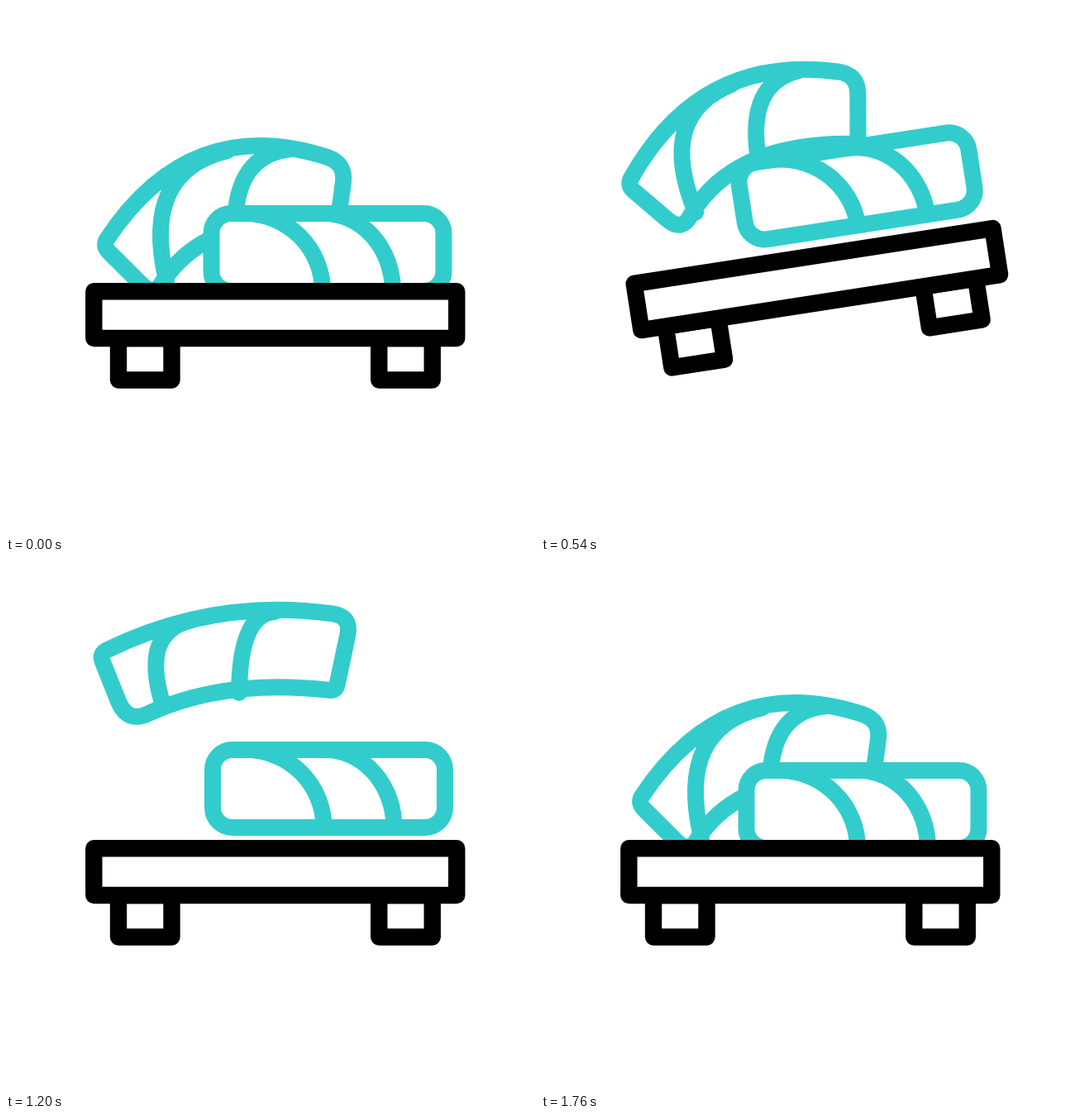
An HTML page with a canvas for the animation above (1800 ms loop, 640 px wide and 640 px high).

```html
<!DOCTYPE html>
<html lang="en">
<head>
<meta charset="utf-8">
<title>Sushi toss</title>
<style>
  html, body { margin: 0; width: 100%; height: 100%; overflow: hidden; background: #fff; }
  canvas { display: block; width: 640px; height: 640px; }
</style>
</head>
<body>
<canvas id="stage" width="640" height="640"></canvas>
<script>
const ctx = document.getElementById('stage').getContext('2d');
const LOOP = 1800, STEP = 20;
const TEAL = '#33cccc', BLACK = '#000';

// Key points of the slice: bent x, y, then flat x, y
const SLICE = {
  tip: [117, 290, 113, 221],
  crown: [226, 117.5, 257, 147],
  shoulder: [411, 191, 418, 176],
  heel: [400, 272, 399, 266],
  belly: [234.5, 240, 251, 247],
  base: [179, 352, 147, 306],
  stripes: [
    [[268, 175, 225, 180], [163, 200, 163, 194], [194, 332, 189, 280]],
    [[345, 173, 325, 170], [277, 179.5, 283, 172.5], [277, 268, 282, 268]]
  ]
};

const ramp = (t, a, b) => Math.min(1, Math.max(0, (t - a) / (b - a)));
const ease = (t, a, b) => {
  const u = ramp(t, a, b);
  return u * u * (3 - 2 * u);
};

// Thrown up briskly, falls like a free body
function hop(t, start, apex, end, height) {
  if (t <= start || t >= end) return 0;
  const drop = t < apex
    ? ((apex - t) / (apex - start)) ** 1.2
    : ((t - apex) / (end - apex)) ** 2;
  return height * (1 - drop);
}

function pose(t) {
  return {
    dip: 109 * ease(t, 0, 345) - 167 * ease(t, 345, 587) + 58 * ease(t, 587, 940)
      + 66.5 * (ease(t, 1247, 1468) - ease(t, 1468, 1760)),
    tilt: 5 * ease(t, 0, 310) - 14.3 * ease(t, 310, 570) + 9.3 * ease(t, 570, 837),
    roll: hop(t, 388, 820, 1294, 70),
    slice: hop(t, 388, 907, 1477, 151) + hop(t, 1477, 1620, 1760, 140),
    flat: ramp(t, 400, 1180) - ease(t, 1465, 1740)
  };
}

// Point on a quadratic curve, or the control point of its part from u to v
const blend = (p, c, q, u, v = u) => p.map((_, i) =>
  p[i] * (1 - u) * (1 - v) + c[i] * (u + v - 2 * u * v) + q[i] * u * v);

const gap = (a, b) => Math.hypot(a[0] - b[0], a[1] - b[1]);

// Closed outline of quadratic edges with rounded corners
function roundedShape(edges) {
  edges.forEach(([p, r, c, q, s], i) => {
    const u = r / (2 * gap(p, c)), v = 1 - s / (2 * gap(q, c));
    const from = blend(p, c, q, u);
    if (i === 0) ctx.moveTo(...from);
    ctx.quadraticCurveTo(...blend(p, c, q, u, v), ...blend(p, c, q, v));
    const next = edges[(i + 1) % edges.length];
    const w = next[1] / (2 * gap(next[0], next[2]));
    ctx.quadraticCurveTo(...q, ...blend(next[0], next[2], next[3], w));
  });
  ctx.closePath();
}

function paint(color, width, build, fill) {
  ctx.beginPath();
  build();
  if (fill) {
    ctx.fillStyle = '#fff';
    ctx.fill();
  }
  ctx.strokeStyle = color;
  ctx.lineWidth = width;
  ctx.stroke();
}

function drawSlice(lift, m) {
  const at = ([x, y, fx, fy]) => [x + (fx - x) * m, y + (fy - y) * m - lift];
  const middle = (a, b) => [(a[0] + b[0]) / 2, (a[1] + b[1]) / 2];
  const { tip, crown, shoulder, heel, belly, base } = SLICE;
  const [a, b, c, d] = [tip, shoulder, heel, base].map(at);
  const baseRound = 22 + 8 * m;
  paint(TEAL, 20, () => roundedShape([
    [a, 10, at(crown), b, 23],
    [b, 23, middle(b, c), c, 8],
    [c, 8, at(belly), d, baseRound],
    [d, baseRound, middle(d, a), a, 10]
  ]), true);
  paint(TEAL, 20, () => {
    for (const stripe of SLICE.stripes) {
      const [from, bow, to] = stripe.map(at);
      ctx.moveTo(...from);
      ctx.quadraticCurveTo(...bow, ...to);
    }
  });
}

function drawRoll(lift) {
  ctx.save();
  ctx.translate(Math.min(1.6, lift * 0.06), -lift);
  paint(TEAL, 20, () => ctx.roundRect(248.5, 251, 281, 94, 24), true);
  paint(TEAL, 20, () => {
    ctx.ellipse(289, 345, 94, 94, 0, -Math.PI / 2, 0);
    ctx.moveTo(385, 251);
    ctx.ellipse(385, 345, 83, 94, 0, -Math.PI / 2, 0);
  });
  ctx.restore();
}

function drawBoard() {
  for (const x of [136, 451.3]) paint(BLACK, 20.4, () => ctx.rect(x, 402, 64.5, 50.5), true);
  paint(BLACK, 20.4, () => ctx.rect(106.3, 345.2, 439, 56.8), true);
}

function draw(t) {
  const now = pose(t);
  ctx.fillStyle = '#fff';
  ctx.fillRect(0, 0, 640, 640);
  ctx.lineJoin = ctx.lineCap = 'round';
  ctx.save();
  ctx.translate(320, 320 + now.dip);
  ctx.rotate(now.tilt * Math.PI / 180);
  ctx.translate(-320, -320);
  drawSlice(now.slice, now.flat);
  drawRoll(now.roll);
  drawBoard();
  ctx.restore();
}

function tick() {
  const t = performance.now() % LOOP;
  draw(Math.floor(t / STEP) * STEP);
  requestAnimationFrame(tick);
}
tick();
</script>
</body>
</html>
```
